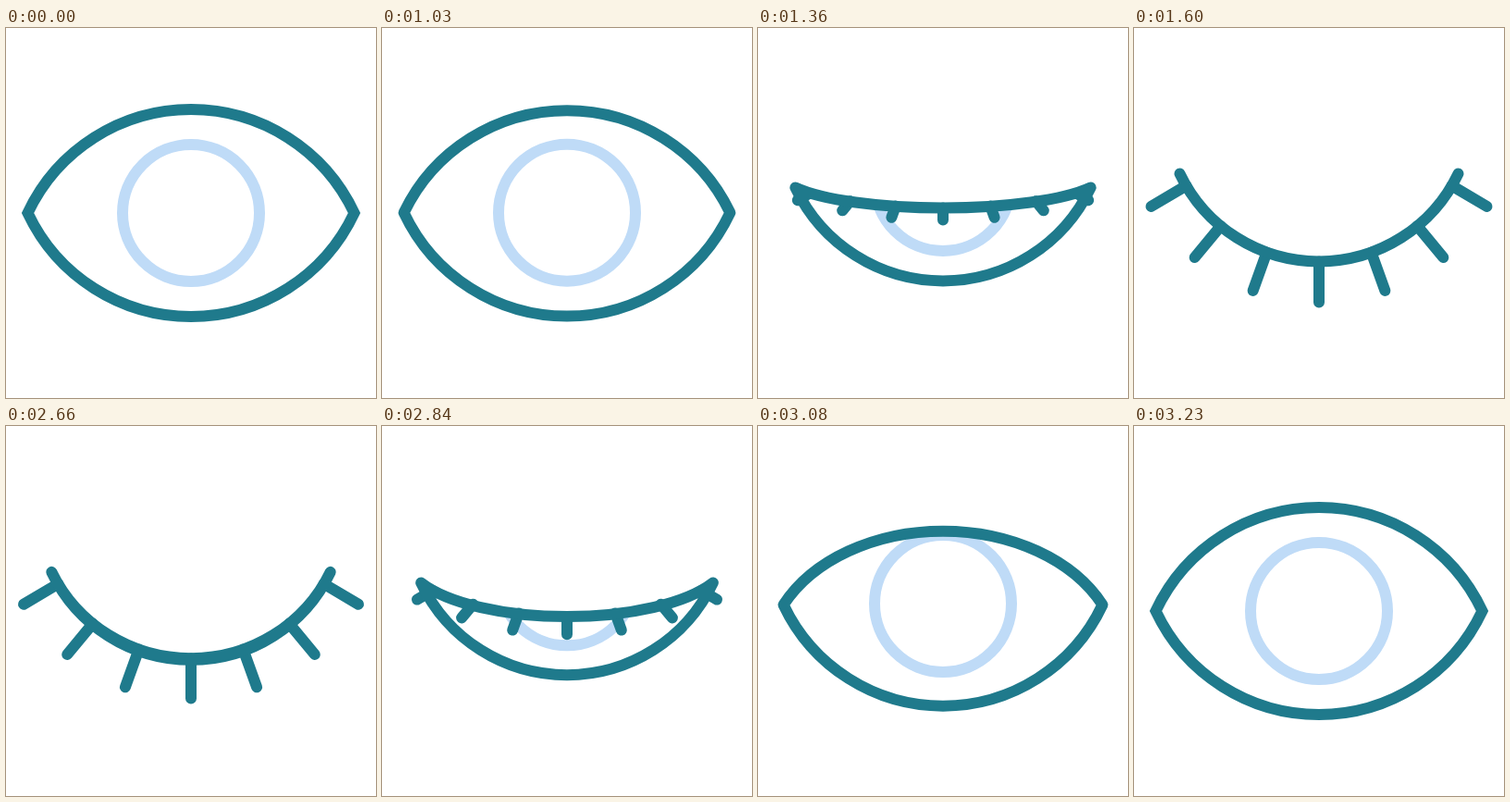
These frames come from a looping animation (400x400 px, 3.26 s). An HTML page with a canvas:

```html
<!DOCTYPE html>
<html lang="en">
<head>
<meta charset="utf-8">
<title>Blinking eye</title>
<style>
  html, body { margin: 0; width: 100%; height: 100%; overflow: hidden; background: #fff; }
  canvas { display: block; width: 400px; height: 400px; }
</style>
</head>
<body>
<canvas id="stage" width="400" height="400"></canvas>
<script>
const ctx = document.getElementById('stage').getContext('2d');
const TEAL = '#1f7a8c', SKY = '#bfdbf7';
const LOOP = 3260, STEP = 30, MOVE = 600;
const CLOSE_AT = 1000, OPEN_AT = 2630;

// Lash layout, mirrored around the middle lash
const LASH_PAIRS = 3, LASH_ANGLE = 19.8 * Math.PI / 180, LASH_LENGTH = 44;

const mix = (a, b, k) => a + (b - a) * k;

// Half of a circular lid as a Bezier curve; positive depth bulges down
function makeLid(width, y, depth) {
  const radius = (width * width + depth * depth) / (2 * Math.abs(depth));
  const angle = Math.asin(width / radius);
  const handle = 4 / 3 * Math.tan(angle / 4) * radius;
  return {
    width, y, radius, handle,
    apex: y + depth,
    dx: handle * Math.cos(angle),
    dy: handle * Math.sin(angle) * Math.sign(depth)
  };
}

function mixLid(a, b, k) {
  const lid = {};
  for (const key in a) lid[key] = mix(a[key], b[key], k);
  return lid;
}

const OPEN_TOP = makeLid(176.5, 200, -112);
const OPEN_LOW = makeLid(176.5, 200, 112);
const SHUT = makeLid(150.5, 157.5, 94.9);

// Smoothstep progress of a move, advancing in fixed steps
function ease(time, start) {
  const raw = Math.floor((time - start) / STEP) * STEP / MOVE;
  const x = Math.min(1, Math.max(0, raw));
  return x * x * (3 - 2 * x);
}

// Adds a lid running from one corner to the other; side -1 starts at the left
function addLid(path, lid, side) {
  const { width, y, apex, handle, dx, dy } = lid;
  const x = 200 + side * width;
  path.bezierCurveTo(x - side * dx, y + dy, 200 + side * handle, apex, 200, apex);
  path.bezierCurveTo(200 - side * handle, apex, 400 - x + side * dx, y + dy, 400 - x, y);
}

function eyePath(shut) {
  const top = mixLid(OPEN_TOP, SHUT, shut);
  const path = new Path2D();
  path.moveTo(200 - top.width, top.y);
  addLid(path, top, -1);
  addLid(path, mixLid(OPEN_LOW, SHUT, shut), 1);
  path.closePath();
  return path;
}

function drawIris(eye, shut) {
  ctx.save();
  ctx.clip(eye);
  ctx.strokeStyle = SKY;
  ctx.beginPath();
  ctx.arc(200, 200 - 51 * shut, 74, 0, Math.PI * 2);
  ctx.stroke();
  ctx.restore();
}

// Lashes grow from the half-shut lid to spokes around the shut one
function drawLashes(shut) {
  const grow = shut * 2 - 1;
  if (grow <= 0) return;
  const centerY = SHUT.apex - SHUT.radius;
  ctx.beginPath();
  for (let i = -LASH_PAIRS; i <= LASH_PAIRS; i++) {
    const angle = i * LASH_ANGLE;
    const spoke = r => [
      mix(200 + i * 49, 200 + r * Math.sin(angle), grow),
      mix(170 + i * i * 1.5, centerY + r * Math.cos(angle), grow)
    ];
    ctx.moveTo(...spoke(SHUT.radius));
    ctx.lineTo(...spoke(SHUT.radius + LASH_LENGTH));
  }
  ctx.stroke();
}

function draw(time) {
  const shut = time < OPEN_AT ? ease(time, CLOSE_AT) : 1 - ease(time, OPEN_AT);
  const eye = eyePath(shut);
  ctx.fillStyle = '#fff';
  ctx.fillRect(0, 0, 400, 400);
  ctx.lineWidth = 12;
  ctx.lineCap = 'round';
  // Corners are sharp only while the eye rests fully open
  ctx.lineJoin = shut === 0 ? 'miter' : 'round';
  if (shut < 1) drawIris(eye, shut);
  ctx.strokeStyle = TEAL;
  drawLashes(shut);
  ctx.stroke(eye);
}

function tick() {
  draw(performance.now() % LOOP);
  requestAnimationFrame(tick);
}
tick();
</script>
</body>
</html>
```
